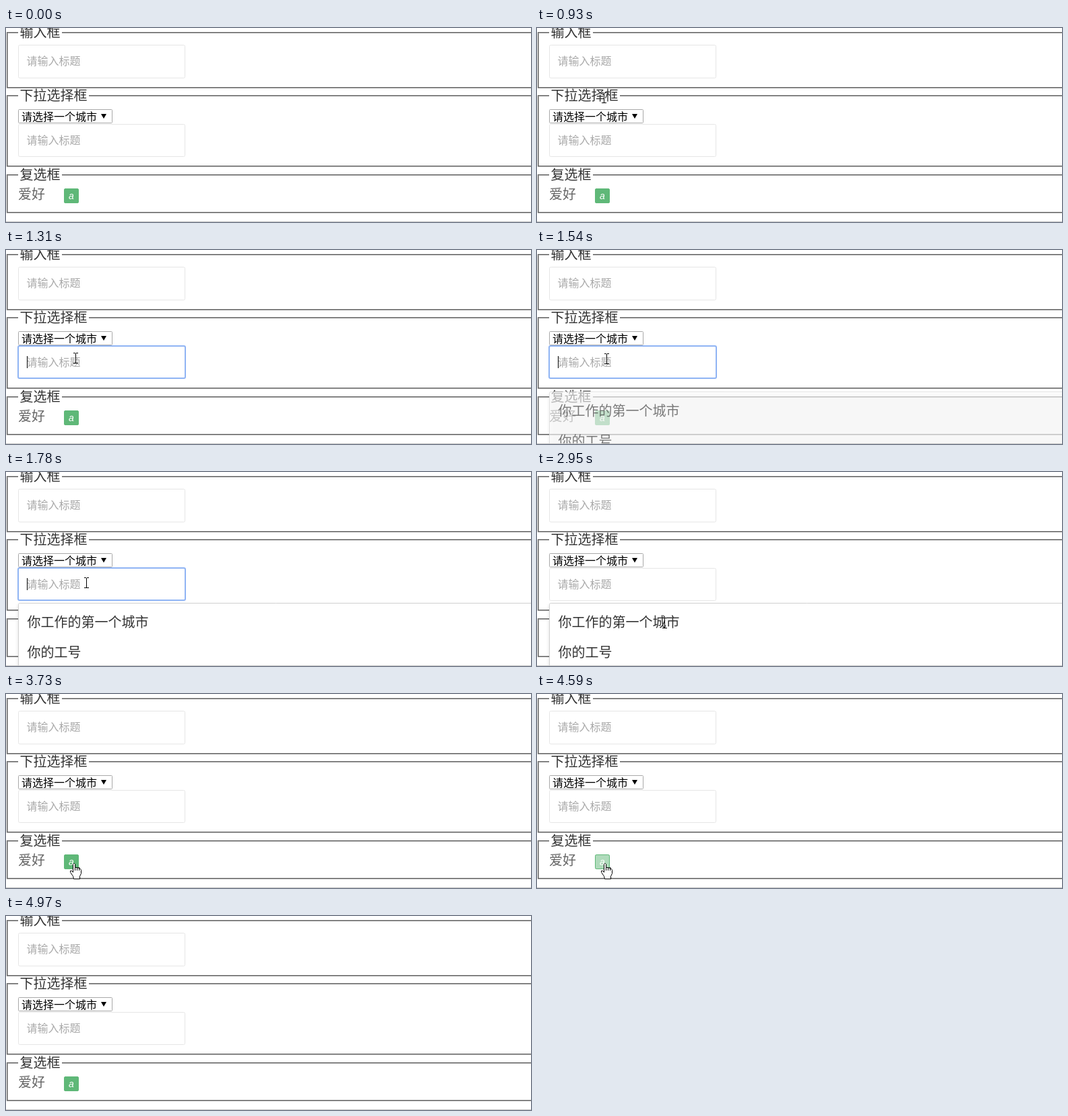
An HTML page with a canvas that plays this animation: 779 by 289 pixels, repeating every 5.43 s.

```html
<!DOCTYPE html>
<html lang="zh">
<head>
<meta charset="utf-8">
<style>
  html, body { margin: 0; width: 100%; height: 100%; overflow: hidden; background: #fff; }
  canvas { display: block; }
</style>
</head>
<body>
<canvas id="stage" width="779" height="289"></canvas>
<script>
const W = 779, H = 289, LOOP = 5430;
const ctx = document.getElementById('stage').getContext('2d');
const CJK = '"Noto Sans CJK SC", "Noto Sans CJK JP", "Noto Sans CJK", sans-serif';

const BURSTS = [
  [70, 610, 8], [680, 1170, 7], [1230, 1690, 7], [1780, 2250, 7], [2330, 2800, 7],
  [2880, 3340, 7], [3430, 3730, 5], [3960, 4040, 2], [4590, 4970, 6]
];

// Pointer: [time, x, y, shape used from here on]
const POINTER = [
  [70, 481, 248, 'arrow'], [330, 250, 185, 'beam'], [400, 190, 158, 'beam'],
  [460, 146, 138, 'arrow'], [540, 112, 120, 'arrow'], [605, 100, 104, 'beam'],
  [680, 98, 82, 'arrow'], [760, 97, 63, 'beam'], [843, 98, 79, 'arrow'],
  [920, 99, 103, 'beam'], [1005, 99, 128, 'arrow'], [1085, 100, 148, 'beam'],
  [1170, 101, 157, 'beam'], [1300, 103, 161, 'beam'], [1700, 103, 163, 'beam'],
  [2250, 210, 174, 'beam'], [2330, 221, 172, 'beam'], [2480, 244, 167, 'beam'],
  [2640, 222, 202, 'arrow'], [2800, 196, 222, 'beam'], [2880, 189, 225, 'beam'],
  [3030, 189, 225, 'arrow'], [3340, 124, 246, 'arrow'], [3500, 111, 249, 'arrow'],
  [3570, 105, 251, 'hand'], [3730, 100, 252, 'hand'], [4650, 100, 252, 'hand'],
  [4735, 190, 256, 'arrow'], [4815, 385, 262, 'arrow'], [4890, 593, 267, 'arrow']
];

const clamp = v => Math.max(0, Math.min(1, v));
const lerp = (a, b, k) => a + (b - a) * k;

function snap(t) {
  const burst = BURSTS.filter(b => b[0] <= t).pop();
  if (!burst) return 0;
  const [start, end, steps] = burst;
  const gap = (end - start) / (steps - 1);
  return start + gap * Math.min(steps - 1, Math.floor((t - start + 10) / gap));
}

// CSS "ease", cubic-bezier(.25, .1, .25, 1)
function ease(p) {
  const bezier = (a, b, u) => 3 * a * u * (1 - u) ** 2 + 3 * b * u * u * (1 - u) + u ** 3;
  let lo = 0, hi = 1;
  for (let i = 0; i < 20; i++) {
    const mid = (lo + hi) / 2;
    if (bezier(.25, .25, mid) < p) lo = mid; else hi = mid;
  }
  return bezier(.1, 1, lo);
}

function rect(x, y, w, h, color) {
  ctx.fillStyle = color;
  ctx.fillRect(x, y, w, h);
}

function rounded(x, y, w, h, r, fill, stroke, line = 1) {
  ctx.beginPath();
  ctx.roundRect(x, y, w, h, r);
  if (fill) { ctx.fillStyle = fill; ctx.fill(); }
  if (stroke) { ctx.strokeStyle = stroke; ctx.lineWidth = line; ctx.stroke(); }
}

function text(str, x, middle, size, color) {
  ctx.font = `300 ${size}px ${CJK}`;
  ctx.fillStyle = color;
  ctx.fillText(str, x, Math.round(middle + size * .37));
}

function fieldset(top, bottom, legend) {
  const dark = '#666', light = '#a2a2a2';
  rect(1, top, W, 1, dark);
  rect(1, top, 1, bottom - top, dark);
  rect(2, top + 1, W, 1, light);
  rect(2, top + 1, 1, bottom - top - 1, light);
  rect(2, bottom - 2, W, 1, dark);
  rect(1, bottom - 1, W, 1, light);
  rect(18, top - 1, legend.length * 20 + 5, 4, '#fff');
  text(legend, 20.5, top + 1, 20, '#333');
}

function input(y, h, focused, caret) {
  rounded(18.5, y + .5, 247, h - 1, 2, '#fff', '#e6e6e6');
  if (focused) rounded(18, y, 248, h - 1, 2, null, '#8fb4f4', 2);
  text('请输入标题', 30.5, y + 24, 16, '#a9a9a9');
  if (caret) rect(31, y + 15, 1, 18, '#000');
}

function select() {
  rounded(18.5, 121.5, 139, 20, 1, '#fff', '#a9a9a9');
  text('请选择一个城市', 23, 132, 16, '#000');
  ctx.beginPath();
  ctx.moveTo(141, 128);
  ctx.lineTo(149, 128);
  ctx.lineTo(145, 135);
  ctx.fill();
}

function checkbox(checked) {
  const green = '#5fb878';
  rounded(86.5, 239.5, 21, 21, 2, '#fff', green);
  ctx.globalAlpha = checked;
  rounded(86, 239, 22, 22, 2.5, green);
  ctx.globalAlpha = 1;
  ctx.font = 'italic 14px "Liberation Sans", sans-serif';
  ctx.fillStyle = '#fff';
  ctx.fillText('a', 93, 255);
}

function dropdown(t) {
  const k = ease(clamp((t - 1452) / 300));
  ctx.save();
  ctx.globalAlpha = lerp(.3, 1, k);
  ctx.translate(0, lerp(30, 0, k));
  ctx.save();
  ctx.shadowColor = 'rgba(0,0,0,.12)';
  ctx.shadowBlur = 5;
  ctx.shadowOffsetY = 2.5;
  rounded(18, 195, W, 160, 2, '#fff');
  ctx.restore();
  rounded(18.5, 195.5, W, 160, 2, null, '#d2d2d2');
  text('你工作的第一个城市', 31.5, 224, 20, '#333');
  text('你的工号', 31.5, 269, 20, '#333');
  ctx.restore();
}

function outline(points) {
  ctx.beginPath();
  points.forEach(([x, y]) => ctx.lineTo(x + .5, y + .5));
  ctx.closePath();
  ctx.fillStyle = '#fff';
  ctx.fill();
  ctx.strokeStyle = '#000';
  ctx.lineWidth = 1;
  ctx.stroke();
}

const SHAPES = {
  arrow() {
    outline([[0, 0], [0, 16], [4, 12], [7, 18], [9, 17], [6, 11], [11, 11]]);
  },
  beam() {
    rect(0, -7, 1, 15, '#000');
    for (const y of [-8, 7]) {
      rect(-3, y, 3, 1, '#000');
      rect(1, y, 3, 1, '#000');
    }
  },
  hand() {
    outline([[-1, 1], [0, 0], [1, 0], [2, 1], [2, 6], [5, 6], [8, 7], [10, 8], [11, 10],
      [11, 15], [9, 19], [9, 23], [0, 23], [-1, 19], [-5, 13], [-5, 11], [-3, 11], [-1, 13]]);
    for (const x of [2, 5, 8]) rect(x, 6, 1, 5, '#000');
  }
};

function pointer(t) {
  if (t < 70 || t > 4930) return;
  let i = POINTER.length - 1;
  while (POINTER[i][0] > t) i--;
  const a = POINTER[i], b = POINTER[i + 1] || a;
  const k = clamp((t - a[0]) / (b[0] - a[0] || 1));
  ctx.save();
  ctx.translate(Math.round(lerp(a[1], b[1], k)), Math.round(lerp(a[2], b[2], k)));
  SHAPES[a[3]]();
  ctx.restore();
}

function draw(t) {
  const focused = t >= 1300 && t < 2880;
  const caret = focused && (t - 1300) % 1000 < 500;
  const checked = t < 4300 ? 1 - clamp((t - 3910) / 100) : clamp((t - 4540) / 100);

  rect(0, 0, W, H, '#fff');
  fieldset(6, 90, '输入框');
  input(25, 50);
  fieldset(100, 207, '下拉选择框');
  select();
  input(143, 49, focused, caret);
  fieldset(218, 276, '复选框');
  text('爱好', 18, 248, 20, '#666');
  checkbox(checked);
  if (t >= 1455 && t < 3030) dropdown(t);
  rect(0, 288, W, 1, '#c8c8c8');
  pointer(t);
}

const began = performance.now();
function tick() {
  draw(snap((performance.now() - began) % LOOP));
  requestAnimationFrame(tick);
}
tick();
</script>
</body>
</html>
```
